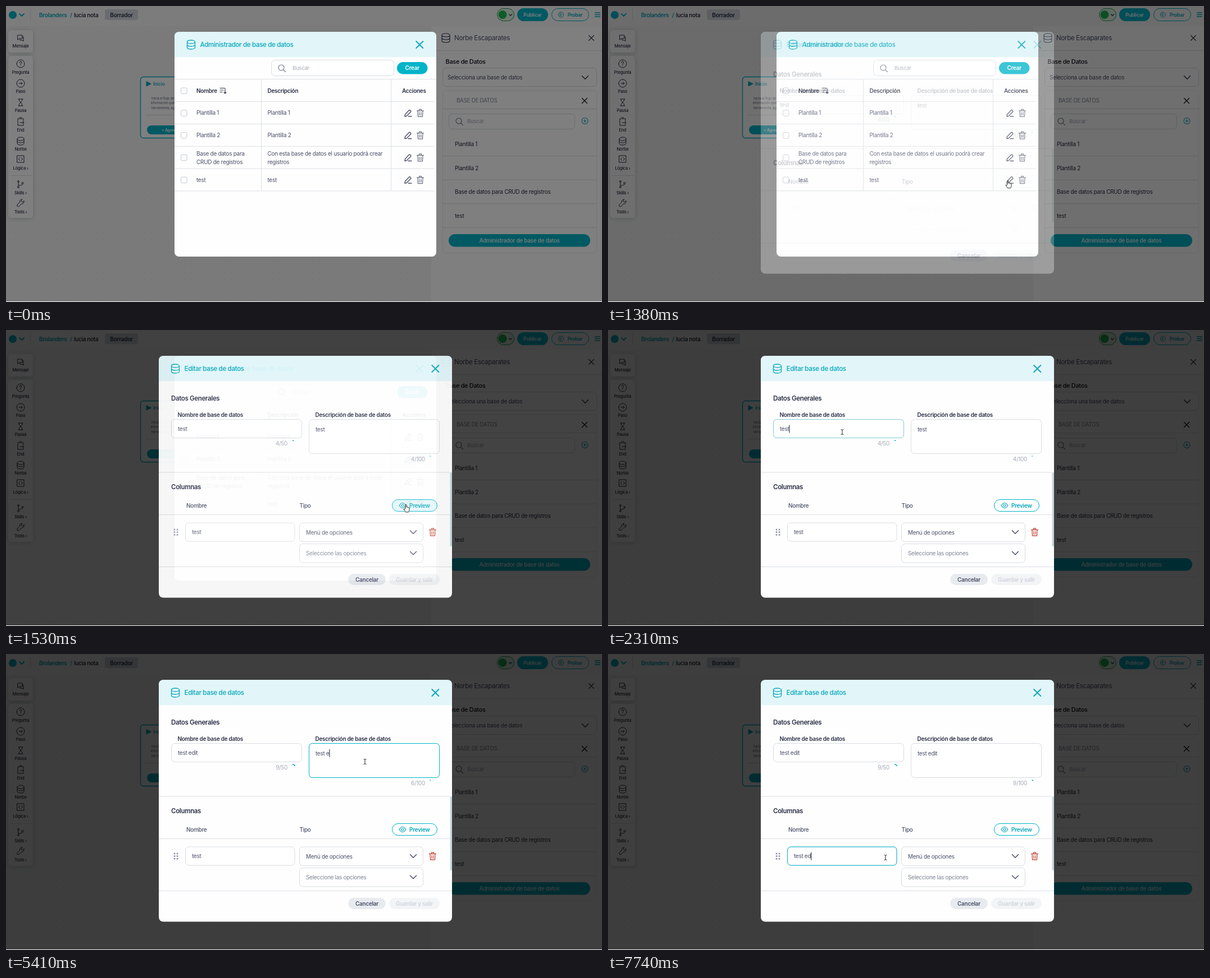
Recreate the animation shown at these times as an HTML page. Size 1061x528 px, loop 8 s.

```html
<!DOCTYPE html>
<html lang="es">
<head>
<meta charset="utf-8">
<title>Editar base de datos</title>
<style>
  html, body { margin: 0; width: 100%; height: 100%; overflow: hidden; background: #fff; }
  svg { display: block; width: 100vw; height: 100vh; }
  text { font-family: Inter, "Open Sans", sans-serif; letter-spacing: -.03em; white-space: pre; }
  .card { filter: drop-shadow(0 1px 4px rgba(0, 0, 0, .16)); }
</style>
</head>
<body>
<svg id="stage" viewBox="0 0 1061 528" preserveAspectRatio="none"></svg>
<script>
const LOOP = 8000;
const TEAL = '#00b4c8', TITLE = '#06a6ba', NAVY = '#2b2f45', CELL = '#4b4f68',
      GRAY = '#a3a9b5', EDGE = '#d8dce2', LINE = '#dcdfe4';

// ---- drawing helpers (text is placed by the middle of its capitals) ----
const text = (x, y, s, { size = 10, fill = CELL, w = 400, anchor = 'start', id = '' } = {}) =>
  `<text ${id && `id="${id}"`} x="${x}" y="${y + size * .36}" font-size="${size}" font-weight="${w}" fill="${fill}" text-anchor="${anchor}">${s}</text>`;
const box = (x, y, w, h, r = 0, fill = 'none', stroke = 'none', extra = '') =>
  `<rect x="${x}" y="${y}" width="${w}" height="${h}" rx="${r}" fill="${fill}" stroke="${stroke}" ${extra}/>`;
const icon = (x, y, d, color = NAVY, sw = 1.1, fill = 'none') =>
  `<path transform="translate(${x} ${y})" d="${d}" fill="${fill}" stroke="${color}" stroke-width="${sw}" stroke-linecap="round" stroke-linejoin="round"/>`;
const line = (x1, y1, x2, y2, color = LINE) =>
  `<path d="M${x1} ${y1}L${x2} ${y2}" stroke="${color}"/>`;
const dot = (x, y, r, fill) => `<circle cx="${x}" cy="${y}" r="${r}" fill="${fill}"/>`;
const button = (x, y, w, h, s, fill, color = '#fff', size = 10, weight = 600) =>
  box(x, y, w, h, h / 2, fill) + text(x + w / 2, y + h / 2, s, { size, fill: color, w: weight, anchor: 'middle' });
const ring = r => `M${-r} 0a${r} ${r} 0 1 0 ${2 * r} 0a${r} ${r} 0 1 0 ${-2 * r} 0`;
const cross = r => `M${-r} ${-r}L${r} ${r}M${r} ${-r}L${-r} ${r}`;
const chevron = r => `M${-r} ${-r / 2}L0 ${r / 2}L${r} ${-r / 2}`;

const DB = 'M-7-5c0-4 14-4 14 0s-14 4-14 0v10c0 4 14 4 14 0v-10M-7 0c0 4 14 4 14 0';
const PENCIL = 'M-6 6l.5-3.5 7-7.5q1-1 2 0l1 1q1 1 0 2l-7.5 7.5zM0 6h6';
const TRASH = 'M-6-4H6M-2-4v-2.5h4v2.5M-4.5-4l.5 10.5h8l.5-10.5M-1.5-1v5M1.5-1v5';
const LENS = 'M-6-1a5 5 0 1 0 10 0a5 5 0 1 0-10 0M2.6 2.8L6.5 6.5';
const EYE = 'M-6 0q6-9 12 0q-6 9-12 0M-2 0a2 2 0 1 0 4 0a2 2 0 1 0-4 0';

// ---- page behind the dialogs ----
const canvas = () =>
  `<pattern id="dots" width="12" height="12" patternUnits="userSpaceOnUse">${dot(6, 8, .7, '#e2e4e8')}</pattern>` +
  box(0, 0, 1061, 528, 0, '#f5f6f7') + box(0, 36, 757, 492, 0, 'url(#dots)');

function sidebar() {
  const items = [
    [57, 74, 'Mensaje', 'M-5-5h8v6h-5l-3 2zM-1 2v2h4l2 2v-8h-2'],
    [103, 121, 'Pregunta', ring(7) + 'M-2-2q0-2 2-2t2 2q0 1-2 2.5v1M0 3.6v.1'],
    [138, 155, 'Paso', ring(7) + 'M-3 0h6M1-2l2 2-2 2'],
    [172, 189, 'Pausa', 'M-4-6h8M-4 6h8M-3-6q0 4 3 6q-3 2-3 6M3-6q0 4-3 6q3 2 3 6'],
    [207, 224, 'End', 'M5-2v-4h-10v12h10v-2M-1 1h7M4-1l2 2-2 2M-2-8h4'],
    [241, 258, 'Norbe', 'M-6-4c0-4 12-4 12 0s-12 4-12 0v8c0 4 12 4 12 0v-8M-6 0c0 4 12 4 12 0'],
    [273, 291.5, 'Lógica ›', 'M-6-6h12v12h-12zM-1.5-2.5l-2 2.5 2 2.5M1.5-2.5l2 2.5-2 2.5'],
    [318, 336, 'Skills ›', 'M-4-3v6M-5.5-5a1.5 1.5 0 1 0 3 0a1.5 1.5 0 1 0-3 0M-5.5 5a1.5 1.5 0 1 0 3 0a1.5 1.5 0 1 0-3 0M2-2a1.5 1.5 0 1 0 3 0a1.5 1.5 0 1 0-3 0M3.5 0q0 2-7 2'],
    [352, 369.5, 'Tools ›', 'M6-4l-3 2-2-2 2-3q-5 0-4.5 5l-5 5q0 3 3 3l5-5q5 0 4.5-5z']
  ];
  return box(4, 43, 44, 40, 5, '#fff', 'none', 'class="card"') +
    box(4, 89, 44, 289, 5, '#fff', 'none', 'class="card"') + line(7, 302.5, 46, 302.5) +
    items.map(([iy, ty, s, d]) => icon(26, iy, d, NAVY, 1) +
      text(26, ty - 2.7, s, { size: 7.5, fill: NAVY, w: 500, anchor: 'middle' })).join('');
}

function topBar() {
  return box(0, 0, 1061, 36, 0, '#fafafa') + dot(12, 16, 7, TEAL) + icon(28, 16, chevron(4), TEAL, 1.8) +
    line(43.5, 5, 43.5, 26) +
    text(59, 16, 'Brolanders', { fill: TITLE, w: 600 }) + text(114, 16, '/', { fill: TITLE, w: 600 }) +
    text(121, 16, 'lucia nota', { fill: '#15182a', w: 500 }) +
    box(176, 6, 59, 19, 4, '#d3d8e0') + text(205.5, 16, 'Borrador', { fill: NAVY, w: 600, anchor: 'middle' }) +
    box(874.5, 4.5, 30, 22, 11, '#dff5e4', '#1f9d4d') + dot(884, 15.5, 7.5, '#1fb855') +
    icon(898, 16, chevron(2.5), NAVY) +
    button(910, 4, 55, 23, 'Publicar', TEAL, '#fff', 8.7) +
    box(971.5, 4.5, 66, 22, 11, 'none', TEAL) + icon(988, 15.5, ring(4.5), TITLE, 1) +
    icon(988, 15.5, 'M-1.2-1.8l3 1.8-3 1.8z', TITLE, .8) +
    text(1013, 15.5, 'Probar', { size: 8.7, fill: TITLE, w: 600, anchor: 'middle' }) +
    icon(1053, 15.5, 'M-4.5-3.5h9M-4.5 0h9M-4.5 3.5h9', TITLE, 1.3);
}

function startNode() {
  const small = (y, x, s) => text(x, y, s, { size: 5.9, fill: '#6b6f80' });
  return box(239.5, 126.5, 110, 109, 5, '#fff', TEAL, 'stroke-width="1.4"') +
    icon(250, 139, 'M0-4v8l8-4z', TITLE, 1, TITLE) + text(262, 139, 'Inicio', { size: 8.7, fill: TITLE, w: 500 }) +
    small(164.5, 259, 'Inicia el flujo de la charla') + small(173, 257.5, 'información que usará') +
    small(182, 258.5, 'herramienta, agrega') + line(249, 194.5, 340, 194.5) +
    box(251, 213, 90, 16, 8, TEAL) + text(277, 221, '+ Agregar', { size: 7, fill: '#fff', w: 600 });
}

function panel() {
  const rows = ['Plantilla 1', 'Plantilla 2', 'Base de datos para CRUD de registros', 'test'];
  return box(757, 36, 304, 492, 0, '#fff') + icon(783, 57, DB, NAVY) +
    text(798, 57, 'Norbe Escaparates', { size: 11.6 }) + icon(1042, 57, cross(4.5), NAVY) + line(757, 79.5, 1061, 79.5) +
    text(782.5, 99, 'Base de Datos', { size: 11, fill: '#0d0f1a', w: 500 }) +
    box(777.5, 110.5, 274, 33, 6, 'none', EDGE) + text(786, 127, 'Selecciona una base de datos') +
    icon(1031, 127.5, chevron(5.5), NAVY, 1.4) +
    box(777.5, 150.5, 274, 290, 6, 'none', '#eceef1') + text(802, 168, 'BASE DE DATOS', { size: 9.8, fill: '#868b99' }) +
    icon(1030, 169, cross(4.5), '#0d0f1a', 1.3) + line(777, 183.5, 1052, 183.5) +
    box(788.5, 192.5, 224, 27, 6, 'none', EDGE) + icon(807, 206, LENS, '#6b6f80') +
    text(821, 206, 'Buscar', { size: 9.6, fill: GRAY }) + icon(1030.5, 205, ring(5.5) + 'M-2.5 0h5M0-2.5v5', TITLE) +
    rows.map((s, i) => text(799, 246.5 + i * 42.6, s, { fill: NAVY }) +
      line(777, 267.5 + i * 42.6, 1052, 267.5 + i * 42.6)).join('') +
    button(788, 407, 252, 22.5, 'Administrador de base de datos', TEAL, '#fff', 10, 500);
}

// ---- dialogs ----
const dialog = (x, w, h, title) =>
  box(x, 46.3, w, h, 8, '#fefefe') +
  `<path d="M${x} 91.3V54.3q0-8 8-8h${w - 16}q8 0 8 8v37z" fill="#e2f6f9"/>` +
  icon(x + 29.5, 69, DB, TITLE, 1.3) + text(x + 45.5, 69, title, { size: 11.6, fill: TITLE, w: 500 }) +
  icon(x + w - 29.7, 69, cross(6), TITLE, 1.9);

function listDialog() {
  const head = { fill: NAVY, w: 600 };
  const long = ['Base de datos para', 'CRUD de registros', 'Con esta base de datos el usuario podrá crear', 'registros'];
  const pair = (x, y, a, b) => text(x, y - 7, a) + text(x, y + 7.5, b);
  const check = y => box(311.5, y - 5, 10.5, 10.5, 2, '#fff', '#c3c8d0');
  const row = (name, i) => {
    const y = 190.8 + i * 39.8;
    return check(y) + (name ? text(339, y, name) + text(465.5, y, name)
        : pair(339, y, long[0], long[1]) + pair(465.5, y, long[2], long[3])) +
      icon(716, y, PENCIL, NAVY, 1.2) + icon(737.5, y, TRASH, '#6b6f80', 1.2) + line(300, y + 19.7, 762, y + 19.7);
  };
  return dialog(300, 466, 400.7, 'Administrador de base de datos') +
    box(472.5, 96.5, 218, 28, 6, '#fff', EDGE) + icon(491, 111, LENS, '#6b6f80') +
    text(510, 111, 'Buscar', { size: 9.6, fill: GRAY }) + button(696, 100, 54.5, 21.5, 'Crear', TEAL) +
    line(300, 130.5, 766, 130.5) + line(300, 170.5, 762, 170.5) +
    line(454.5, 131, 454.5, 330) + line(685.5, 131, 685.5, 330) + check(151) +
    text(339, 151.3, 'Nombre', head) + icon(386, 151, 'M-5-4.5h8M-5-1h6M-5 2.5h4M4-4v9M2 3l2 2 2-2', NAVY) +
    text(465.5, 151.3, 'Descripción', head) + text(705, 151.3, 'Acciones', head) +
    ['Plantilla 1', 'Plantilla 2', '', 'test'].map(row).join('');
}

// Editable fields: frame, text place, focus span, key times, counter
const fields = [
  { x: 294.5, y: 159.5, w: 232, h: 33, tx: 306, ty: 176.5, on: 2310, off: 4600,
    keys: [3000, 3180, 3330, 3700, 4020], max: 50, cx: 501, cy: 202.5, ax: 510, ay: 202 },
  { x: 539.5, y: 159.5, w: 232, h: 61, tx: 551, ty: 177, on: 4600, off: 7000,
    keys: [4940, 5410, 5580, 5960, 6270], max: 100, cx: 746, cy: 230.5, ax: 754.5, ay: 230 },
  { x: 319.5, y: 344, w: 194.5, h: 33, tx: 331, ty: 360.7, on: 7000, off: LOOP, keys: [7420, 7580, 7740] }
];
const preview = { x: 687.5, y: 302.5, w: 80, h: 21 };

function editDialog() {
  const label = { fill: NAVY, w: 600 }, head = { size: 11.5, fill: NAVY, w: 600 }, col = { w: 500 };
  const select = (y, s, fill) => box(522.5, y, 220, 33.5, 6, '#fff', EDGE) + text(534, y + 17, s, { fill }) +
    icon(725, y + 16.5, chevron(5.5), CELL, 1.5);
  const grip = [0, 1, 2, 3, 4, 5].map(i => dot(300 + i % 2 * 5, 356 + (i >> 1) * 4.6, 1.5, '#8d93a8')).join('');
  const input = (f, i) => box(f.x, f.y, f.w, f.h, 6, '#fff', EDGE) +
    box(f.x, f.y, f.w, f.h, 6, 'none', TEAL, `id="edge${i}"`) +
    text(f.tx, f.ty, 'test', { id: 'value' + i }) + box(0, f.ty - 7, 1, 14, 0, '#15182a', 'none', `id="caret${i}"`) +
    (f.max ? text(f.cx, f.cy, '', { fill: GRAY, anchor: 'end', id: 'count' + i }) +
      `<path id="arc${i}" fill="none" stroke="${TITLE}" stroke-width="1.5"/>` : '');
  const inputs = fields.map(input);
  // Controls of the column table, which appear a little after the dialog
  const controls =
    box(preview.x, preview.y, preview.w, preview.h, 10.5, '#fff', TEAL, 'id="preview"') +
    icon(706, 313, EYE, TITLE, 1.2) + text(718, 313, 'Preview', { fill: TITLE, w: 600 }) +
    grip + select(344, 'Menú de opciones', CELL) + select(381.5, 'Seleccione las opciones', '#7d8292') +
    icon(759.5, 360.5, TRASH, '#c9503f', 1.3) + inputs[2];
  return dialog(272, 522, 431.2, 'Editar base de datos') +
    text(294, 122, 'Datos Generales', head) + text(305.5, 151.3, 'Nombre de base de datos', label) +
    text(550.5, 151.3, 'Descripción de base de datos', label) + inputs[0] + inputs[1] +
    line(272, 254, 791, 254) + box(790.5, 254, 3.5, 132, 1.5, '#c6d8de') +
    text(294, 279.7, 'Columnas', head) + text(321, 313.3, 'Nombre', col) + text(522.5, 313.3, 'Tipo', col) +
    line(272, 329.5, 791, 329.5) + line(272, 422.5, 794, 422.5) + `<g id="controls">${controls}</g>` +
    button(609, 435, 67, 20, 'Cancelar', '#e7ebef', CELL) +
    button(682, 435, 90, 20, 'Guardar y salir', '#f2f4f6', '#d0d5dc');
}

const pointers =
  `<g id="arrow">${icon(0, 0, 'M0 0v12l3-2.5 2 4.5 2-1-2-4h4z', '#111', .8, '#fff')}</g>` +
  `<g id="hand">${icon(0, 0, 'M-1 7V1q1-1.5 2 0v4q1-.8 2 .3q1-.6 1.8.5q1-.3 1.2 1v3q0 2-1.5 4h-5q-1-2-3.5-5q0-1.5 2-.5z', '#111', .9, '#fff')}</g>` +
  `<g id="beam">${icon(0, 0, 'M-2-4.5q2 0 2 1q0-1 2-1M0-3.5v7M-2 4.5q2 0 2-1q0 1 2 1', '#222', 1)}</g>`;

const shade = '<rect width="1061" height="527" opacity=".5"/>';
document.getElementById('stage').innerHTML =
  canvas() + topBar() + sidebar() + startNode() + panel() + shade + listDialog() +
  `<g id="edit">${shade}${editDialog()}</g>` + pointers + box(0, 527, 1061, 1, 0, '#fff');

// ---- motion ----
const $ = id => document.getElementById(id);
const clamp = v => Math.max(0, Math.min(1, v));
const inside = (r, x, y) => x > r.x && x < r.x + r.w && y > r.y && y < r.y + r.h;
const show = (el, v) => el.setAttribute('opacity', v);

// Pointer path: time, x, y
const path = [
  [150, 977, 498], [450, 850, 390], [700, 722, 282], [800, 709, 270], [1000, 712, 311],
  [1640, 712, 311], [1760, 703, 301], [1950, 580, 244], [2250, 417, 182],
  [4150, 417, 182], [4550, 639, 192], [6380, 639, 192], [6900, 494, 363]
];
function pointerAt(t) {
  const next = path.findIndex(p => p[0] > t);
  const n = next < 0 ? path.length - 1 : next;
  const a = path[Math.max(0, n - 1)], b = path[n];
  const k = clamp((t - a[0]) / (b[0] - a[0] || 1));
  return [a[1] + (b[1] - a[1]) * k, a[2] + (b[2] - a[2]) * k];
}

function drawField(f, i, t) {
  const hits = f.keys.filter(k => k <= t), active = t >= f.on && t < f.off;
  const value = 'test' + ' edit'.slice(0, hits.length), el = $('value' + i);
  el.textContent = value;
  show($('edge' + i), active ? clamp(.4 + (t - f.on) / 380) : 0);
  const since = t - Math.max(f.on, ...hits);
  const caret = $('caret' + i);
  show(caret, active && since % 1000 < 460 ? 1 : 0);
  caret.setAttribute('x', f.tx + el.getComputedTextLength());
  if (!f.max) return;
  $('count' + i).textContent = `${value.length}/${f.max}`;
  const a = value.length / f.max * 2 * Math.PI;
  $('arc' + i).setAttribute('d',
    `M${f.ax} ${f.ay - 5}A5 5 0 0 1 ${f.ax + 5 * Math.sin(a)} ${f.ay - 5 * Math.cos(a)}`);
}

function draw(t) {
  const fade = clamp((t - 1350) / 240), open = fade > 0;
  show($('edit'), 1 - (1 - fade) ** 2);
  show($('controls'), clamp((t - 1365) / 185));
  fields.forEach((f, i) => drawField(f, i, t));

  const [x, y] = pointerAt(t);
  const overPreview = open && inside(preview, x, y);
  const overPencil = !open && x < 726 && y > 262 && y < 325;
  const kind = open && fields.some(f => inside(f, x, y)) ? 'beam' : overPreview || overPencil ? 'hand' : 'arrow';
  $('preview').setAttribute('fill', overPreview ? '#e2f6f9' : '#fff');
  for (const id of ['arrow', 'hand', 'beam']) {
    show($(id), t >= 150 && id === kind ? 1 : 0);
    $(id).setAttribute('transform', `translate(${x} ${y})`);
  }
}

const start = performance.now();
function tick() {
  draw((performance.now() - start) % LOOP);
  requestAnimationFrame(tick);
}
tick();
</script>
</body>
</html>
```
